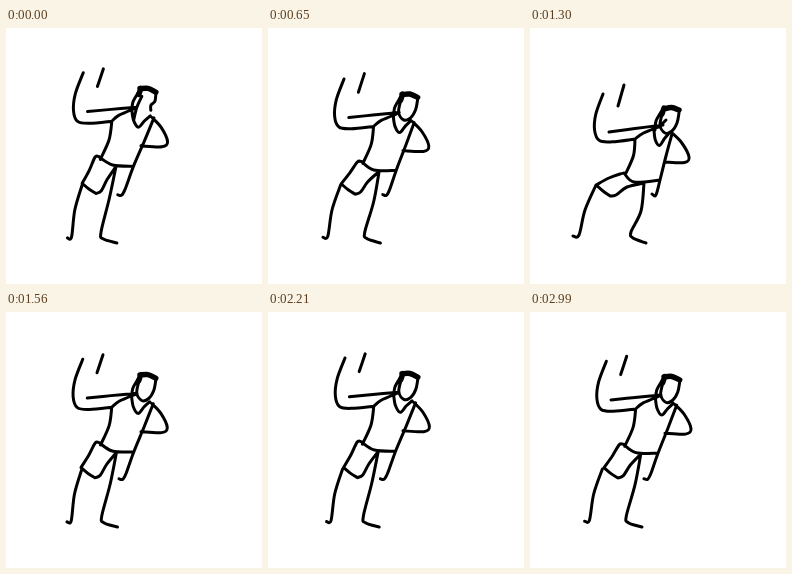
Animation, 256 px wide and 256 px high, one loop 3.12 s. Source, as an HTML page:

```html
<!DOCTYPE html>
<html lang="en">
<head>
<meta charset="utf-8">
<title>Dancing figure</title>
<style>
  html, body { margin: 0; width: 100%; height: 100%; overflow: hidden; background: #fff; }
  svg { display: block; width: 100%; height: 100%; }
  path { fill: none; stroke: #000; stroke-linecap: round; stroke-linejoin: round; }
</style>
</head>
<body>
<svg viewBox="0 0 256 256">
  <path id="lines" stroke-width="3"/>
  <path id="hair" stroke-width="5.5"/>
</svg>
<script>
const STEP = 130;

// Per drawing: how far the body sinks and how wide the legs spread (0 upright, 1 crouched).
const sink = [.15, .4, .78, 1, .78, .4, .1, -.06, .07, .6, 1, .6,
              .25, .14, .05, 0, .08, .2, .32, .36, .2, .08, .2, .33];
const spread = [.08, .4, .8, 1, .8, .4, .1, 0, .02, .6, 1, .5,
                .1, .06, .02, 0, .08, .22, .38, .42, .25, .1, .25, .42];
const eyeDrawings = [2, 3, 4, 7, 8, 9, 10, 14, 15, 16];

const at = (a, b, t) => a + (b - a) * t;

// Smooth curve through the points.
function curve(pts) {
  let d = `M${pts[0]}`;
  for (let i = 0; i < pts.length - 1; i++) {
    const a = pts[i], b = pts[i + 1], prev = pts[i - 1] || a, next = pts[i + 2] || b;
    const c1 = a.map((v, k) => v + (b[k] - prev[k]) / 6);
    const c2 = b.map((v, k) => v - (next[k] - a[k]) / 6);
    d += `C${c1} ${c2} ${b}`;
  }
  return d;
}

// Curve whose displacement runs from one end's shift to the other's.
function shifted(pts, t, from, to = from) {
  return curve(pts.map((p, i) =>
    p.map((v, k) => v + t * at(from[k], to[k], i / (pts.length - 1)))));
}

const blend = (high, low, t) =>
  curve(high.map((p, i) => p.map((v, k) => at(v, low[i][k], t))));

function arms(t) {
  return shifted([[98, 38], [92, 55]], t, [-4, 19], [-4, 23])
    + shifted([[78, 41], [70, 62], [68, 79], [72, 90], [84, 92], [106, 90]], t, [-5, 25], [-1, 21])
    + shifted([[82, 80], [105, 78], [130, 76]], t, [-3, 24], [3, 21])
    + shifted([[147, 87], [156, 97], [162, 111], [156, 116], [135, 115]], t, [-6, 17], [0, 19]);
}

function torso(t) {
  return shifted([[106, 90], [113, 84], [129, 77]], t, [-1, 21], [2, 21])
    + shifted([[106, 90], [103, 109], [94, 129]], t, [-1, 21], [2, 16])
    + shifted([[126, 78], [128, 89], [133, 96], [139, 90], [145, 85]], t, [-2, 24], [-5, 19])
    + blend([[149, 87], [139, 110], [127, 136], [118, 160], [114, 167], [110, 167]],
            [[142, 106], [136, 128], [130, 152], [127, 164], [125, 168], [122, 166]], t)
    + blend([[93, 126], [107, 134], [127, 136]], [[94, 145], [104, 154], [130, 152]], t);
}

function legs(t, s) {
  return blend([[93, 126], [89, 126], [84, 141], [78, 155]],
               [[94, 145], [90, 146], [79, 150], [66, 157]], t)
    + blend([[78, 155], [85, 161], [92, 165]], [[66, 157], [73, 163], [80, 168]], t)
    + blend([[92, 165], [97, 162], [102, 150], [109, 136]],
            [[80, 168], [86, 167], [97, 159], [114, 155]], t)
    + blend([[77, 157], [70, 182], [67, 209], [63, 210]],
            [[66, 157], [55, 182], [49, 207], [43, 208]], s)
    + blend([[109, 137], [102, 168], [94, 204], [96, 211], [110, 215]],
            [[114, 155], [111, 183], [101, 204], [103, 210], [116, 215]], t);
}

function face(t, n) {
  const move = [-1, 22];
  const part = (...pts) => shifted(pts, t, move);
  let d = part([132, 62], [127, 71], [126, 80]);
  if (n === 0) {
    d += part([136, 65], [131, 76], [128, 88])
      + part([150, 63], [149, 70], [145, 74], [145, 79]);
  } else {
    d += part([134, 61], [131, 75], [136, 83], [143, 81], [148, 73], [150, 63]);
  }
  if (eyeDrawings.includes(n)) d += part([132, 75], [137, 70]);
  return d;
}

const hair = t => shifted([[134, 57], [142, 57], [150, 61]], t, [0, 24], [-1, 21])
  + shifted([[135, 57], [133, 63]], t, [-1, 23]);

const linePath = document.getElementById("lines");
const hairPath = document.getElementById("hair");

function draw() {
  const n = Math.floor(performance.now() / STEP) % sink.length;
  const t = sink[n];
  linePath.setAttribute("d", arms(t) + torso(t) + legs(t, spread[n]) + face(t, n));
  hairPath.setAttribute("d", hair(t));
  requestAnimationFrame(draw);
}
draw();
</script>
</body>
</html>
```
